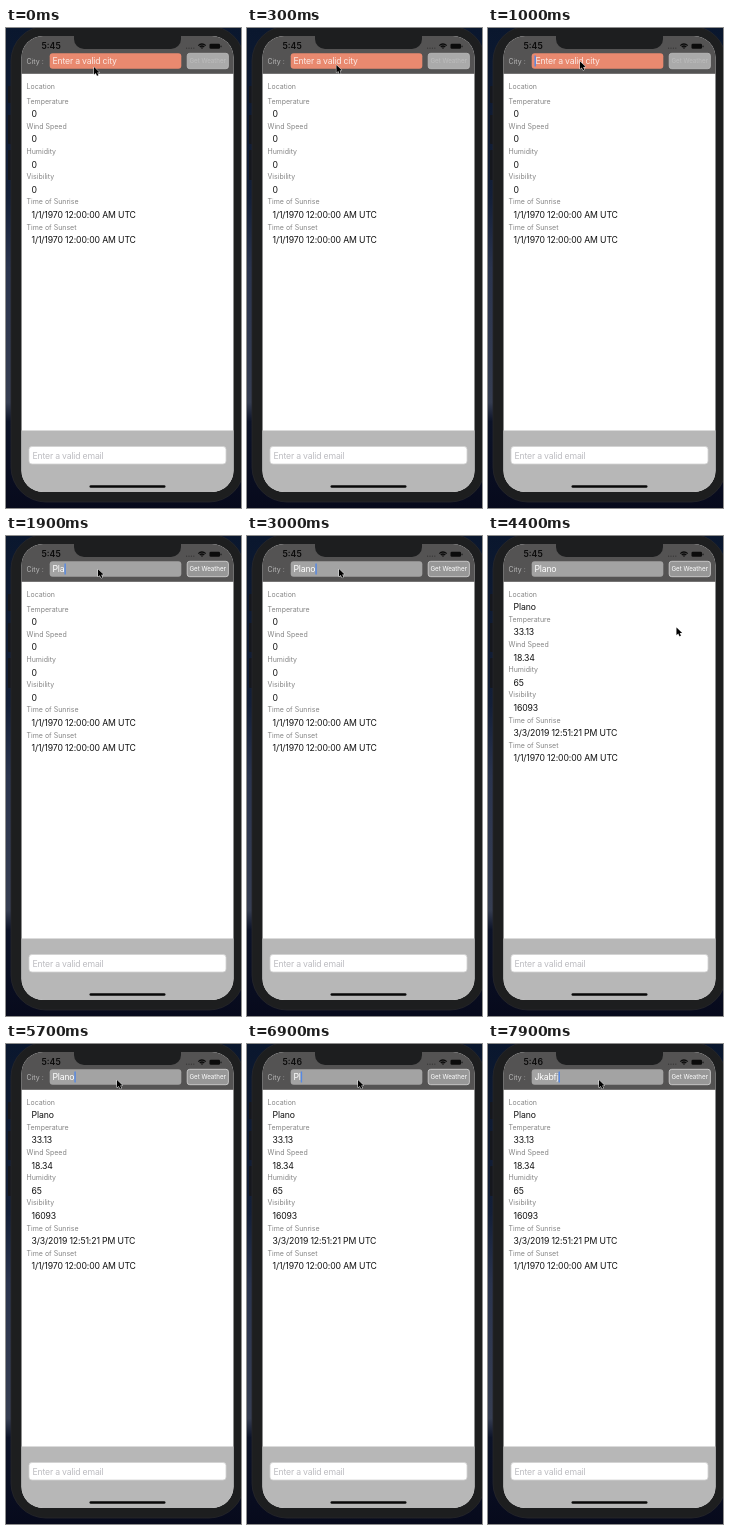
An HTML page with a canvas for the animation above (8 s loop, 235x480 px).

```html
<!DOCTYPE html>
<html lang="en">
<head>
<meta charset="utf-8">
<title>Weather app demo</title>
<style>
  html, body { margin: 0; width: 100%; height: 100%; overflow: hidden; background: #080c20; }
  canvas { display: block; width: 235px; height: 480px; }
</style>
</head>
<body>
<canvas id="stage" width="235" height="480"></canvas>
<script>
const ctx = document.getElementById('stage').getContext('2d');
const LOOP = 8000;
const FONT = 'Inter, Roboto, sans-serif';
const BEZEL = '#1d1e1f';

// [time, text in the city field]
const typing = [
  [0, ''], [1300, 'P'], [1600, 'Pl'], [1900, 'Pla'], [2200, 'Plan'], [2500, 'Plano'],
  [6200, 'Plan'], [6500, 'Pla'], [6700, 'Pl'], [7000, 'P'], [7100, ''],
  [7300, 'J'], [7400, 'Jk'], [7600, 'Jka'], [7800, 'Jkab'], [7900, 'Jkabfj']
];

// [time, x, y] of the pointer tip
const pointerPath = [
  [0, 88, 39], [100, 88, 39], [600, 92, 33.5], [3000, 92, 33], [3700, 200, 34],
  [3900, 200, 34], [4200, 188.5, 91.5], [5000, 188.5, 91.5], [5550, 111, 36], [LOOP, 111, 36]
];

const emptyReport = [
  ['Location', ''], ['Temperature', '0'], ['Wind Speed', '0'], ['Humidity', '0'],
  ['Visibility', '0'], ['Time of Sunrise', '1/1/1970 12:00:00 AM UTC'],
  ['Time of Sunset', '1/1/1970 12:00:00 AM UTC']
];
const planoValues = ['Plano', '33.13', '18.34', '65', '16093', '3/3/2019 12:51:21 PM UTC',
  '1/1/1970 12:00:00 AM UTC'];
const planoReport = emptyReport.map(([label], i) => [label, planoValues[i]]);

const between = (t, a, b) => t >= a && t < b;

function typedText(t) {
  return typing.filter(([start]) => start <= t).pop()[1];
}

function pointerAt(t) {
  const i = pointerPath.findIndex(([end]) => end > t);
  const [t0, x0, y0] = pointerPath[i - 1];
  const [t1, x1, y1] = pointerPath[i];
  const p = (t - t0) / (t1 - t0);
  const e = p * p * (3 - 2 * p);
  return [x0 + (x1 - x0) * e, y0 + (y1 - y0) * e];
}

function box(x, y, w, h, r, fill, stroke) {
  ctx.beginPath();
  ctx.roundRect(x, y, w, h, r);
  if (fill) { ctx.fillStyle = fill; ctx.fill(); }
  if (stroke) { ctx.strokeStyle = stroke; ctx.lineWidth = 0.8; ctx.stroke(); }
}

// Draws text centred on cap height at y and returns its width.
function text(str, x, y, size, color, { spacing = 0, weight = 400, align = 'left' } = {}) {
  ctx.font = `${weight} ${size}px ${FONT}`;
  ctx.letterSpacing = `${spacing}px`;
  ctx.textAlign = align;
  ctx.fillStyle = color;
  ctx.fillText(str, x, y + size * 0.36);
  return ctx.measureText(str).width;
}

const body = (str, x, y, color, spacing = -0.2) => text(str, x, y, 8.7, color, { spacing });

function drawDesktop() {
  const sky = ctx.createLinearGradient(0, 0, 0, 480);
  sky.addColorStop(0, '#0a172e');
  sky.addColorStop(0.35, '#131f38');
  sky.addColorStop(0.5, '#2a344e');
  sky.addColorStop(0.6, '#2f3850');
  sky.addColorStop(0.78, '#363e52');
  sky.addColorStop(0.82, '#0c1328');
  sky.addColorStop(1, '#070a1c');
  ctx.fillStyle = sky;
  ctx.fillRect(0, 0, 235, 480);
}

function drawPhone() {
  for (const [y, h] of [[58, 17], [87, 29], [122, 30]]) box(2, y, 4, h, 1, '#15171d');
  box(5, -2, 233, 476, 35, BEZEL, '#27282b');
  ctx.save();
  ctx.beginPath();
  ctx.roundRect(15.5, 8, 212, 456, 21.5);
  ctx.clip();
  ctx.fillStyle = '#fff';
  ctx.fillRect(15, 8, 213, 456);
  ctx.fillStyle = '#545353';
  ctx.fillRect(15, 8, 213, 37.8);
  ctx.fillStyle = '#b7b7b7';
  ctx.fillRect(15, 402.5, 213, 62);
  ctx.restore();
  box(68, 4, 107, 17, [0, 0, 10, 10], BEZEL);
  box(23, 418.5, 197, 17.5, 3, '#fff', '#d2d2d2');
  body('Enter a valid email', 26.5, 427.5, '#bcbcc0');
  box(83.5, 457.2, 76, 2.6, 1.3, '#080808');
}

function drawStatus(t) {
  text(t < 6400 ? '5:45' : '5:46', 35.5, 18.3, 8.7, '#0b0b0b', { weight: 600 });
  for (let x = 180; x < 189; x += 2.4) box(x, 19.6, 1.2, 1.2, 0.6, '#353535');
  ctx.strokeStyle = '#0b0b0b';
  ctx.lineWidth = 1.3;
  for (const r of [1, 3, 5]) {
    ctx.beginPath();
    ctx.arc(196, 21, r, -Math.PI * 0.76, -Math.PI * 0.24);
    ctx.stroke();
  }
  box(203.5, 15.8, 10.5, 5, 1.3, '#0b0b0b');
  box(214.5, 17.4, 1, 1.8, 0.5, '#0b0b0b');
}

function drawSearch(t) {
  const city = typedText(t);
  const valid = city !== '';
  const focused = between(t, 900, 3850) || t >= 5600;
  text('City :', 20.5, 33, 7, '#b8b8b8');
  box(43.7, 25.3, 131.6, 15.4, 3, valid ? '#a3a3a3' : '#e9896f');
  const width = valid
    ? body(city, 46.5, 33, '#fff')
    : body('Enter a valid city', focused ? 47.5 : 46.5, 33, '#fbe9e4');
  if (focused) {
    ctx.fillStyle = '#5488e4';
    ctx.fillRect(46.5 + (valid ? width : 0), 27.5, 1.4, 11);
  }

  const pressed = between(t, 3800, 3950);
  ctx.globalAlpha = pressed ? 0.5 : 1;
  box(181.2, 25.3, 41.2, 15.4, 2.5, valid ? '#979797' : '#aaaaaa', valid ? '#d6d6d6' : '#bcbcbc');
  text('Get Weather', 201.7, 33, 6.2, valid ? '#fff' : '#bdbdbd', { align: 'center' });
  ctx.globalAlpha = 1;
}

function drawReport(t) {
  let y = 58;
  for (const [label, value] of t < 4400 ? emptyReport : planoReport) {
    text(label, 20.5, y, 7, '#858585');
    if (value) body(value, 25.5, y + 13, '#111', -0.13);
    y += value ? 25.2 : 15;
  }
}

function drawPointer(t) {
  const [x, y] = pointerAt(t);
  ctx.save();
  ctx.translate(x, y);
  ctx.beginPath();
  ctx.moveTo(0, 0);
  for (const [px, py] of [[0, 7.6], [1.8, 6], [3, 8.8], [4.4, 8.2], [3.2, 5.5], [5.6, 5.4]]) {
    ctx.lineTo(px, py);
  }
  ctx.closePath();
  ctx.lineJoin = 'round';
  ctx.lineWidth = 1;
  ctx.strokeStyle = '#e6e6e6';
  ctx.stroke();
  ctx.fillStyle = '#000';
  ctx.fill();
  ctx.restore();
}

function render(now) {
  const t = now % LOOP;
  drawDesktop();
  drawPhone();
  drawStatus(t);
  drawSearch(t);
  drawReport(t);
  drawPointer(t);
}

const start = performance.now();
function tick() {
  render(performance.now() - start);
  requestAnimationFrame(tick);
}
tick();
</script>
</body>
</html>
```
